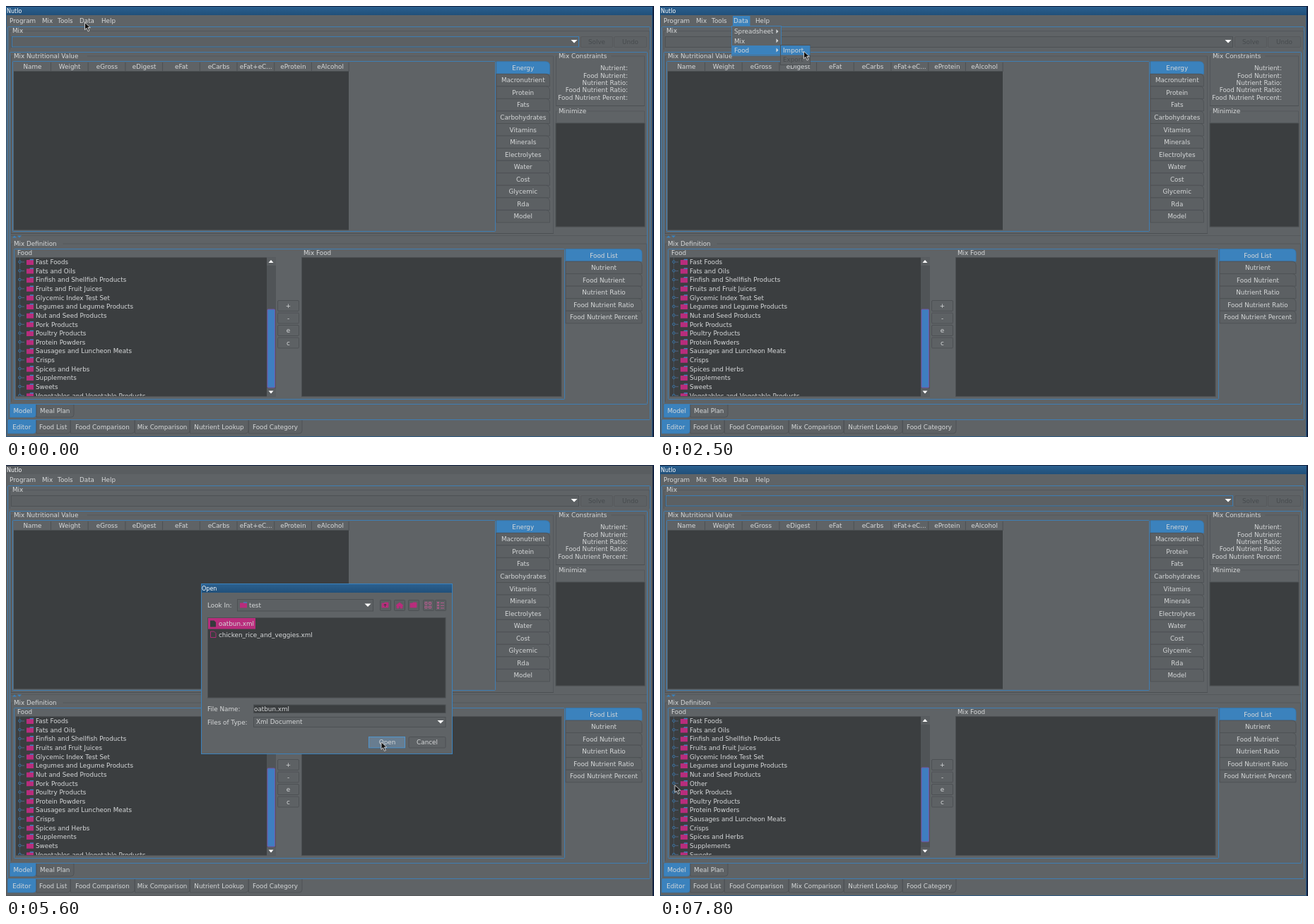
An HTML page for the animation above (8 s loop, 917 by 611 pixels).

```html
<!DOCTYPE html>
<html lang="en">
<head>
<meta charset="utf-8">
<title>Food mix editor</title>
<style>
  html, body { margin: 0; width: 100%; height: 100%; overflow: hidden; background: #5f6366; }
  svg { display: block; }
  text { font: 8.8px "DejaVu Sans", Verdana, sans-serif; white-space: pre; }
</style>
</head>
<body>
<svg id="stage" width="917" height="611" viewBox="0 0 917 611"></svg>
<script>
const LOOP = 8000;
const BG = '#5f6366', DARK = '#3b3e40', EDGE = '#4c5053';
const BLUE = '#3b82bd', PINK = '#b82d7c', INK = '#d6d8d9', DIM = '#474b4e';

const rect = (x1, y1, x2, y2, fill, stroke = 'none', extra = '') =>
  `<rect x="${x1}" y="${y1}" width="${x2 - x1}" height="${y2 - y1}" fill="${fill}" stroke="${stroke}" ${extra}/>`;
const path = (d, fill = 'none', stroke = 'none', extra = '') =>
  `<path d="${d}" fill="${fill}" stroke="${stroke}" ${extra}/>`;
// y is the middle of the capitals
const label = (x, y, s, anchor = 'start', fill = INK, extra = '') =>
  `<text x="${x}" y="${y + 3.2}" text-anchor="${anchor}" fill="${fill}" ${extra}>${s}</text>`;
const group = (id, body) => `<g id="${id}">${body}</g>`;
const frame = (x1, y1, x2, y2, extra = '') =>
  rect(x1 + .5, y1 + .5, x2 - .5, y2 - .5, 'none', BLUE, `stroke-width=".9" rx="1" ${extra}`);
const down = (x, y) => path(`M${x - 4.5} ${y - 2}h9l-4.5 4.5z`, '#fff');
const right = (x, y) => path(`M${x - 1.5} ${y - 3}v6l3-3z`, INK);
const folder = (x, y) =>
  path(`M${x} ${y - 3}h4l1-1h5v8h-10z`, PINK) + path(`M${x + 5} ${y - 3.5}h5`, 'none', BLUE, 'stroke-width="1.5"');

function button(x1, y1, x2, y2, s, ink = INK, edge = EDGE) {
  return rect(x1 + .5, y1 + .5, x2 - .5, y2 - .5, '#5d6164', edge, 'rx="1.5" stroke-width=".9"') +
    label((x1 + x2) / 2, (y1 + y2) / 2, s, 'middle', ink);
}

function titled(x1, y, x2, y2, s) {
  const end = x1 + 5 + s.length * 4.9;
  return path(`M${x1 + .5} ${y2}V${y + .5}h3M${end} ${y + .5}H${x2 - .5}V${y2}`, 'none', '#515558', 'stroke-width=".8"') +
    label(x1 + 4, y, s);
}

function sideTabs(x1, x2, top, names) {
  return names.map((s, i) => {
    const y = top + i * 17.55, on = i === 0;
    return path(`M${x1} ${y}H${x2 - 6}Q${x2} ${y} ${x2} ${y + 6}V${y + 17.5}H${x1}z`,
      on ? BLUE : '#5c6063', on ? '#3576ae' : EDGE, 'stroke-width=".8"') +
      label((x1 + x2) / 2, y + 8.8, s, 'middle');
  }).join('');
}

function bottomTabs(y1, y2, start, tabs) {
  let x = start;
  return tabs.map(([s, end], i) => {
    const shape = `M${x + .5} ${y1}V${y2}H${end - 4}Q${end} ${y2} ${end} ${y2 - 4}V${y1}`;
    const out = path(shape, i ? '#5d6164' : BLUE, i ? EDGE : '#3576ae', 'stroke-width=".8"') +
      label((x + end) / 2, (y1 + y2) / 2, s, 'middle');
    x = end;
    return out;
  }).join('');
}

const foods = ['Fast Foods', 'Fats and Oils', 'Finfish and Shellfish Products', 'Fruits and Fruit Juices',
  'Glycemic Index Test Set', 'Legumes and Legume Products', 'Nut and Seed Products', 'Pork Products',
  'Poultry Products', 'Protein Powders', 'Sausages and Luncheon Meats', 'Crisps', 'Spices and Herbs',
  'Supplements', 'Sweets', 'Vegetables and Vegetable Products'];
const foodsAfter = [...foods.slice(0, 7), 'Other', ...foods.slice(7)];

function tree(names) {
  return path('M19.5 357V553', 'none', '#4d6379', 'stroke-dasharray="1 1"') +
    names.map((s, i) => {
      const y = 363 + i * 12.62;
      return path(`M22 ${y}h4`, 'none', '#5a6f92', 'stroke-width=".8"') +
        `<circle cx="19.5" cy="${y - .3}" r="1.7" fill="${DARK}" stroke="${BLUE}" stroke-width=".9"/>` +
        folder(29, y) + label(42, y, s);
    }).join('');
}

function topBar() {
  const menu = [['Program', 5], ['Mix', 51], ['Tools', 73], ['Data', 104], ['Help', 135]];
  return rect(0, 1, 915, 13, 'url(#bar)', 'none', 'id="titleBar"') +
    label(1, 6.5, 'Nutlo', 'start', '#fff', 'style="font-size:8px"') +
    rect(103, 14, 127.5, 28, BLUE, 'none', 'id="dataOn"') +
    menu.map(([s, x]) => label(x, 20.5, s)).join('') +
    frame(2, 29, 912, 587) +
    titled(5, 35, 911, 62, 'Mix') +
    rect(7.5, 43.5, 810.5, 58.5, '#5c6063', EDGE, 'stroke-width=".9"') + down(804, 50) +
    rect(8.5, 43.5, 810.5, 58, 'none', BLUE, 'id="comboFocus" stroke-width=".9"') +
    button(813, 43, 859, 59, 'Solve', DIM, '#56595c') +
    button(860, 43, 907, 59, 'Undo', DIM, '#56595c');
}

function nutritionPanel() {
  const columns = ['Name', 'Weight', 'eGross', 'eDigest', 'eFat', 'eCarbs', 'eFat+eC...', 'eProtein', 'eAlcohol'];
  const limits = ['Nutrient:', 'Food Nutrient:', 'Nutrient Ratio:', 'Food Nutrient Ratio:', 'Food Nutrient Percent:'];
  return frame(5, 65, 908, 565) +
    titled(7, 70.5, 775, 322, 'Mix Nutritional Value') +
    path('M7 322.5H775', 'none', EDGE) +
    frame(9, 78, 693, 320) +
    rect(11, 93, 485, 317.5, DARK) +
    columns.map((s, i) => label(37.5 + i * 52.7, 86, s, 'middle') +
      path(`M${63.5 + i * 52.7} 80V93`, 'none', EDGE)).join('') +
    path('M11 92.5H485', 'none', EDGE) +
    sideTabs(694, 769.5, 78.8, ['Energy', 'Macronutrient', 'Protein', 'Fats', 'Carbohydrates', 'Vitamins',
      'Minerals', 'Electrolytes', 'Water', 'Cost', 'Glycemic', 'Rda', 'Model']) +
    titled(778, 70.5, 904, 142, 'Mix Constraints') + path('M778 141.5H904', 'none', EDGE) +
    limits.map((s, i) => label(880, 88 + i * 10.4, s, 'end')).join('') +
    titled(778, 148.5, 904, 165, 'Minimize') +
    rect(778, 166, 904, 313, DARK, EDGE) +
    path('M7 325.5H907', 'none', '#55595c') +
    path('M9 328.5l3-3 3 3zM16 325.5h6l-3 3z', BLUE);
}

function definitionPanel() {
  return titled(7, 336.5, 907, 561, 'Mix Definition') +
    frame(11, 344, 791, 558) +
    label(16, 350, 'Food') + label(421, 350, 'Mix Food') +
    rect(14, 356.5, 369, 553.5, DARK) +
    `<g clip-path="url(#treeClip)">${group('treeBefore', tree(foods))}${group('treeAfter', tree(foodsAfter))}</g>` +
    rect(369, 356.5, 382, 553.5, '#505457') +
    rect(370, 430, 380.5, 541, '#3f7ec0', '#7655a8', 'id="thumb" rx="1"') +
    rect(369, 356.5, 382, 368, '#595d60') + rect(369, 542, 382, 553.5, '#595d60') +
    path('M371.5 364h7l-3.5-4z', '#fff') + path('M371.5 545.5h7l-3.5 4z', '#fff') +
    ['+', '-', 'e', 'c'].map((s, i) => button(384, 417 + i * 17.5, 415, 433 + i * 17.5, s)).join('') +
    rect(418.5, 356.5, 786, 553.5, DARK, EDGE) +
    sideTabs(792, 900, 344.5, ['Food List', 'Nutrient', 'Food Nutrient', 'Nutrient Ratio',
      'Food Nutrient Ratio', 'Food Nutrient Percent']) +
    bottomTabs(565, 583, 5, [['Model', 42.5], ['Meal Plan', 96]]) +
    bottomTabs(587, 606, 2, [['Editor', 42.5], ['Food List', 91], ['Food Comparison', 182],
      ['Mix Comparison', 260], ['Nutrient Lookup', 343], ['Food Category', 419]]);
}

function menus() {
  const items = ['Spreadsheet', 'Mix', 'Food'];
  return group('menu', rect(101.5, 28.5, 171.5, 70.5, BG, BLUE, 'stroke-width=".9"') +
      rect(102, 43, 171, 56, BLUE, 'none', 'id="mixOn"') +
      rect(102, 56, 171, 69.5, BLUE, 'none', 'id="foodOn"') +
      items.map((s, i) => label(105, 36 + i * 13.3, s) + right(166, 36 + i * 13.3)).join('')) +
    group('submenu', rect(170.5, 55.5, 212.5, 83.5, BG, EDGE) +
      rect(171, 56, 212.5, 69.5, BLUE, 'none', 'id="importOn"') +
      label(174, 63, 'Import') + label(174, 76, 'Export', 'start', DIM));
}

function dialog() {
  const page = y => path(`M289.5 ${y - 4}h5l2.5 2.5v6h-7.5z`, DARK, PINK, 'stroke-width=".9"');
  const tool = (x, d, fill = PINK, stroke = PINK) =>
    rect(x + .5, 191.5, x + 15.5, 206.5, '#5a5e61', EDGE, 'rx="1"') + path(d, fill, stroke, 'stroke-width=".8"');
  let grid = '', rows = '';
  for (let i = 0; i < 4; i++) grid += `M${593 + i % 2 * 5.5} ${194.5 + (i >> 1) * 5.5}h3v3h-3z`;
  for (let i = 0; i < 3; i++) rows += `M610.5 ${194.5 + i * 3.7}h2v1.5h-2zM615 ${195.5 + i * 3.7}h5`;
  return group('dialog', rect(276.5, 168.5, 631.5, 409.5, BG, BLUE) +
    rect(277, 169, 631, 181, 'url(#bar)') +
    label(277, 174.5, 'Open', 'start', '#fff', 'style="font-size:8px"') +
    label(285, 199, 'Look In:') +
    rect(327.5, 190.5, 519.5, 207, '#5c6063', EDGE) + folder(331, 198.5) + label(344, 199, 'test') + down(512, 198.5) +
    tool(529, 'M532 196h3l1-1h5v7h-9z') + path('M536.5 201v-4m-2 2l2-2 2 2', 'none', DARK) +
    tool(549, 'M552 199l5-4 5 4h-1v4h-3v-3h-2v3h-3v-4z') +
    tool(569, 'M572 196h3l1-1h5v7h-9z') +
    tool(590, grid, 'none', '#ce5b9b') + tool(607, rows, 'none', '#ce5b9b') +
    rect(285.5, 216.5, 622, 330, DARK, EDGE) +
    rect(286, 217, 353, 232.5, PINK, 'none', 'id="fileOn"') +
    page(225) + path('M289 220.5h5.5l2.5 2.5v6.5h-8z', '#363a3c', 'none', 'id="pageOn"') +
    label(301, 225, 'oatbun.xml') +
    page(240) + label(301, 240.5, 'chicken_rice_and_veggies.xml') +
    label(285, 346, 'File Name:') +
    rect(350.5, 340, 622, 351.5, DARK, EDGE) + label(351, 345.7, 'oatbun.xml', 'start', INK, 'id="fileName"') +
    label(285, 364.5, 'Files of Type:') +
    rect(350.5, 357.5, 622, 371.5, '#5c6063', EDGE) + label(354, 364, 'Xml Document') + down(615, 364) +
    rect(513.5, 385.5, 564.5, 401, '#5d6164', '#303437') +
    rect(513.5, 385.5, 564.5, 401, '#687d90', '#4f96cf', 'id="openOn"') +
    label(539.5, 393, 'Open', 'middle') +
    button(569.5, 385, 622.5, 401.5, 'Cancel'));
}

document.getElementById('stage').innerHTML =
  `<defs>
    <linearGradient id="bar" x1="0" y1="0" x2="0" y2="1">
      <stop offset="0" stop-color="#2b608f"/><stop offset="1" stop-color="#21507a"/>
    </linearGradient>
    <clipPath id="treeClip">${rect(14, 357, 369, 553)}</clipPath>
  </defs>` +
  rect(0, 0, 917, 611, '#10203f') + rect(0, 1, 915, 611, BG) +
  topBar() + nutritionPanel() + definitionPanel() + menus() + dialog() +
  path('M.5 13V610.5H914.5V13', 'none', '#285a87', 'id="windowEdge" stroke-width=".9"') +
  `<g id="cursor">${path('M1 .8V11.2l2.5-2.4 2 4.6 1.9-.8-2-4.5H8.8z', '#111', '#f2f2f2', 'stroke-width=".8"')}</g>`;

// [time, x, y]: the pointer holds each place until the next
const pointer = [
  [0, 110.5, 22.5], [900, 113, 36], [1000, 116, 53], [1100, 118, 60], [1200, 122, 62], [1300, 130, 63],
  [1400, 143, 63], [1500, 156, 62], [1600, 168, 62], [1700, 176, 62], [1800, 177, 63], [2000, 190, 63],
  [2100, 199, 63], [2400, 201, 63], [2500, 202.5, 63.5], [3900, 301, 217.5], [4100, 290, 218], [4300, 289, 219],
  [4600, 296, 230], [4800, 453, 338.5], [5000, 508, 376], [5200, 525, 388], [5400, 530, 392],
  [6000, 303, 438], [6400, 67.5, 504], [7000, 59, 492], [7200, 36, 464], [7400, 34, 457],
  [7600, 26, 455], [7800, 20, 453]];

const shown = {
  comboFocus: [[0, 600], [6600, LOOP]],
  dataOn: [[600, 3900]],
  menu: [[600, 3900]],
  mixOn: [[1000, 1100]],
  foodOn: [[1100, 3900]],
  submenu: [[1200, 3900]],
  importOn: [[1700, 3900]],
  dialog: [[3900, 5800]],
  fileOn: [[4300, 5800]],
  pageOn: [[4300, 5800]],
  fileName: [[4600, 5800]],
  openOn: [[5600, 5800]],
  treeBefore: [[0, 6600]],
  treeAfter: [[6600, LOOP]]
};
const el = id => document.getElementById(id);

function draw(t) {
  for (const id in shown) {
    const on = shown[id].some(([from, to]) => t >= from && t < to);
    el(id).setAttribute('display', on ? 'inline' : 'none');
  }
  const [, x, y] = pointer.findLast(([from]) => from <= t);
  el('cursor').setAttribute('transform', `translate(${x} ${y})`);
  const inactive = t >= 3900 && t < 5800;
  el('titleBar').setAttribute('fill', inactive ? '#595d60' : 'url(#bar)');
  el('windowEdge').setAttribute('stroke', inactive ? '#55595c' : '#285a87');
  el('thumb').setAttribute('y', t < 6600 ? 430 : 429);
  el('thumb').setAttribute('height', t < 6600 ? 111 : 105);
}

const start = performance.now();
function tick() {
  draw((performance.now() - start) % LOOP);
  requestAnimationFrame(tick);
}
tick();
</script>
</body>
</html>
```
